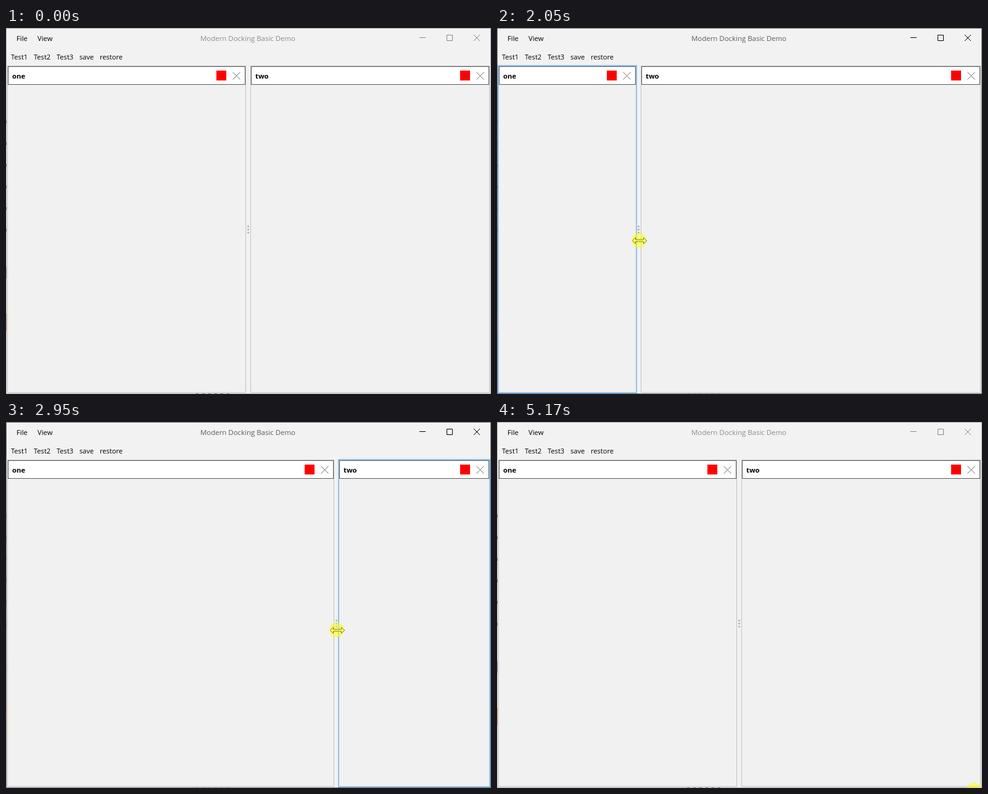
An HTML page that plays this animation: 786x593 px, repeating every 5.25 s.

```html
<!DOCTYPE html>
<html lang="en">
<head>
<meta charset="utf-8">
<title>Docking demo</title>
<style>
  html, body { margin: 0; width: 100%; height: 100%; overflow: hidden; background: #f2f2f2; }
  svg { display: block; width: 786px; height: 593px; }
  text { font: 11.3px "Open Sans", "Noto Sans", sans-serif; white-space: pre; }
  .tool { font-size: 11.1px; }
  .title { font-size: 11.45px; fill: #5c5c5c; }
  .name { font-weight: 700; }
  .buttons { stroke: #000; fill: none; }
  .frame { stroke: #6c6c6c; fill: none; }
  .inactive .title { fill: #8c8c8c; }
  .inactive .buttons { stroke: #888; }
  .inactive .frame { stroke: #aaa; }
  .border { fill: #f1f1f1; stroke: #c2c2c2; }
  .header { fill: #fff; stroke: #5a5a5a; }
  .glow { fill: none; stroke: #90c2ec; stroke-width: 2; }
  .cross { fill: none; stroke: #6e6e6e; }
  .pointer { fill: #fff; stroke: #000; }
</style>
</head>
<body>
<svg id="stage" viewBox="0 0 786 593">
  <rect width="786" height="593" fill="#f2f2f2"/>
  <text x="17" y="21">File</text>
  <text x="51" y="21">View</text>
  <text class="title" x="315" y="21">Modern Docking Basic Demo</text>
  <g class="buttons">
    <path d="M670 15.5h10M714.5 11.5h9v9h-9z"/>
    <path d="M758 11l10 10M768 11l-10 10"/>
  </g>
  <text class="tool" x="8" y="51">Test1</text>
  <text class="tool" x="45" y="51">Test2</text>
  <text class="tool" x="82" y="51">Test3</text>
  <text class="tool" x="119" y="51">save</text>
  <text class="tool" x="152" y="51">restore</text>
  <g id="panes"></g>
  <g id="grip" fill="#afafaf">
    <circle cx=".5" cy="321.5" r="1.5"/>
    <circle cx=".5" cy="326.5" r="1.5"/>
    <circle cx=".5" cy="331.5" r="1.5"/>
  </g>
  <rect class="frame" x=".5" y=".5" width="785" height="592"/>
  <g id="specks" fill="#555">
    <rect y="387" width="1" height="19" fill="#7d5a84"/>
    <rect y="463" width="1" height="28" fill="#a8683a"/>
  </g>
  <g id="cursor">
    <path id="arrow" class="pointer" d="M.5 .5v16l3.7-3.5 2.5 5.8 2.3-1-2.5-5.6h5.2z"/>
    <path id="resize" class="pointer" d="M-10.5 .5l5-5v3.5h13v-3.5l5 5-5 5v-3.5h-13v3.5z"/>
    <circle r="12" fill="#ff0" fill-opacity=".5"/>
  </g>
</svg>
<script>
const LOOP = 5250;
const $ = id => document.getElementById(id);

function add(parent, tag, attrs, text = '') {
  const el = document.createElementNS('http://www.w3.org/2000/svg', tag);
  for (const key in attrs) el.setAttribute(key, attrs[key]);
  el.textContent = text;
  return parent.appendChild(el);
}

// Traces of the desktop behind the window's thin edge
for (let i = 0; i < 6; i++) {
  add($('specks'), 'rect', { x: 0, y: 150 + i * 35, width: 1, height: 5 });
  add($('specks'), 'rect', { x: 308 + i * 10, y: 592, width: 4, height: 1 });
}

function makePane(name) {
  const g = add($('panes'), 'g', {});
  const border = add(g, 'rect', { class: 'border', y: 61.5, height: 529 });
  const glow = add(g, 'rect', { class: 'glow', y: 61, height: 530 });
  const header = add(g, 'rect', { class: 'header', y: 62.5, height: 29 });
  const label = add(g, 'text', { class: 'name', y: 82 }, name);
  const square = add(g, 'rect', { y: 69, width: 16, height: 16, fill: '#f00' });
  const cross = add(g, 'path', { class: 'cross', d: 'M-6 71l12 12M6 71l-12 12' });
  const span = (el, x, width) => { el.setAttribute('x', x); el.setAttribute('width', width); };
  return (left, right, lit) => {
    span(border, left + .5, right - left - 1);
    span(glow, left, right - left);
    span(header, left + 1.5, right - left - 3);
    label.setAttribute('x', left + 8);
    square.setAttribute('x', right - 48);
    cross.setAttribute('transform', `translate(${right - 15.5} .5)`);
    glow.style.display = lit ? '' : 'none';
  };
}
const paneOne = makePane('one');
const paneTwo = makePane('two');

// Smooth 0 to 1 between two times; a power below 1 moves the speed peak earlier
function ease(t, from, to, power = 1) {
  const p = Math.min(1, Math.max(0, (t - from) / (to - from))) ** power;
  return p * p * (3 - 2 * p);
}
const mix = (a, b, p) => Math.round(a + (b - a) * p);

function dividerAt(t) {
  if (t >= 4030) return 392;   // a double click resets it
  return Math.round(392 - 191.5 * ease(t, 1700, 2200, .78) + 347.5 * ease(t, 2500, 3064, .547));
}

function pointerAt(t, divider) {
  if (t < 500) {
    const p = ease(t, 0, 390, .6);
    return [mix(650, 378, p), mix(596, 345, p)];
  }
  if (t < 1690) {
    const x = 378 + 20 * ease(t, 520, 720) - 5 * ease(t, 980, 1200);
    return [Math.round(x), mix(345, 347, ease(t, 520, 1000))];
  }
  if (t < 4030) {
    const y = 347 - 7 * ease(t, 1690, 1750) + 4 * ease(t, 1750, 2050) - 7 * ease(t, 2200, 2620);
    return [divider + 1, Math.round(y)];
  }
  const p = ease(t, 4440, 4960);
  return [mix(549, 773, p), mix(337, 596, p)];
}

function render(t) {
  const step = Math.floor((t - 10) / 30) * 30 + 10;   // the picture advances every 30 ms
  const divider = dividerAt(step);
  const [x, y] = pointerAt(step, divider);
  const oneLit = t >= 1700 && t < 2510;
  const twoLit = t >= 60 && t < 4960 && !oneLit;
  const resizing = t >= 360 && t < 4460;

  paneOne(2, divider - 3, oneLit);
  paneTwo(divider + 4, 784, twoLit);
  $('grip').setAttribute('transform', `translate(${divider} 0)`);
  $('stage').classList.toggle('inactive', t < 1550 || t >= 5170);
  $('cursor').setAttribute('transform', `translate(${x} ${y})`);
  $('cursor').style.display = t < 20 ? 'none' : '';
  $('arrow').style.display = resizing ? 'none' : '';
  $('resize').style.display = resizing ? '' : 'none';
}

const start = performance.now();
function tick() {
  render((performance.now() - start) % LOOP);
  requestAnimationFrame(tick);
}
tick();
</script>
</body>
</html>
```
